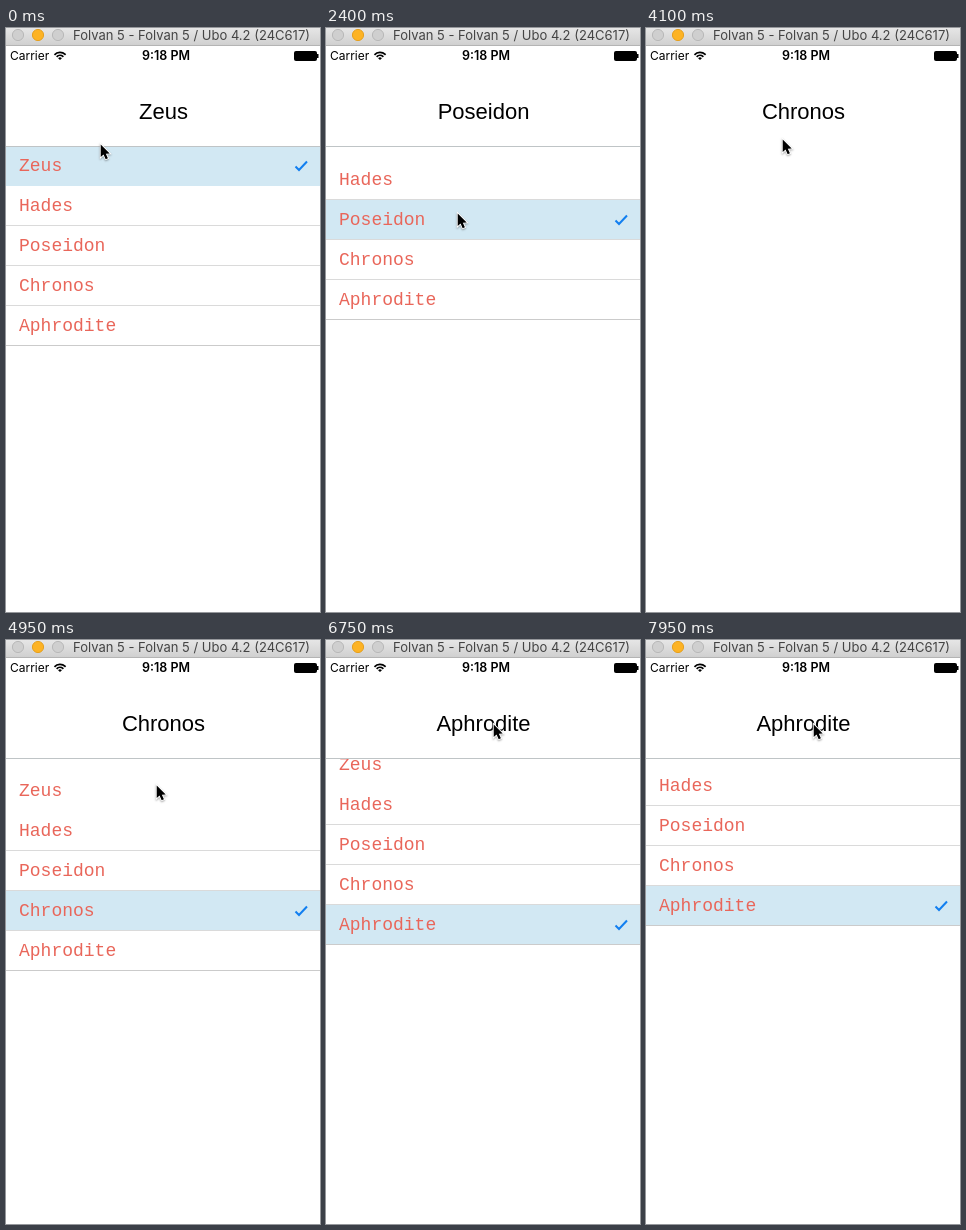
An HTML page with a canvas for the animation above (8000 ms loop, 314 px wide and 584 px high).

```html
<!DOCTYPE html>
<html lang="en">
<head>
<meta charset="utf-8">
<title>Dropdown menu</title>
<style>
  html, body { margin: 0; width: 100%; height: 100%; overflow: hidden; background: #fff; }
  canvas { display: block; }
</style>
</head>
<body>
<canvas id="stage" width="314" height="584"></canvas>
<script>
const ctx = document.getElementById('stage').getContext('2d');
const WIDTH = 314, HEIGHT = 584, LOOP = 8000;
const MENU_TOP = 118, ROW = 40;
const items = ['Zeus', 'Hades', 'Poseidon', 'Chronos', 'Aphrodite'];
const MENU_HEIGHT = items.length * ROW;

// Each close may pick a row; each open springs the list down.
const events = [
  { at: -2000, open: true, pick: 0 },
  { at: 870, open: false },
  { at: 1462, open: true },
  { at: 2333, open: false, pick: 2 },
  { at: 3068, open: true },
  { at: 3770, open: false, pick: 3 },
  { at: 4587, open: true },
  { at: 5722, open: false, pick: 4 },
  { at: 6589, open: true },
  { at: 7246, open: false },
  { at: 7807, open: true }
];

// Pointer tip: time, x, y
const pointer = [
  [0, 94, 116], [150, 94, 116], [700, 159, 85], [1550, 159, 85],
  [2150, 131, 206], [2325, 131, 204], [2400, 131, 185], [2750, 160, 85],
  [3150, 160, 85], [3600, 135, 256], [3770, 135, 256], [4100, 136, 111],
  [4300, 160, 85], [4700, 160, 85], [5400, 127, 291], [5730, 127, 289],
  [5950, 127, 276], [6400, 167, 84], [8000, 167, 84]
];

const smooth = p => p * p * (3 - 2 * p);

function spring(t) {
  const damping = 0.517, peak = 263;
  const phase = Math.PI * t / peak;
  const ratio = damping / Math.sqrt(1 - damping * damping);
  return Math.exp(-ratio * phase) * (Math.cos(phase) + ratio * Math.sin(phase));
}

function menuState(t) {
  let last, selected;
  for (const e of events) {
    if (e.at > t) break;
    last = e;
    selected = e.pick ?? selected;
  }
  const age = t - last.at;
  const hidden = last.open ? spring(age) : smooth(Math.min(1, age / 300));
  return { offset: -MENU_HEIGHT * hidden, selected };
}

function pointerAt(t) {
  const i = pointer.findIndex(k => k[0] > t);
  const [t0, x0, y0] = pointer[i - 1], [t1, x1, y1] = pointer[i];
  const p = smooth((t - t0) / (t1 - t0));
  return [x0 + (x1 - x0) * p, y0 + (y1 - y0) * p];
}

function rect(x, y, w, h, color) {
  ctx.fillStyle = color;
  ctx.fillRect(x, y, w, h);
}

function text(value, x, y, font, color, align = 'left') {
  ctx.font = font;
  ctx.fillStyle = color;
  ctx.textAlign = align;
  ctx.fillText(value, x, y);
}

function polyline(points) {
  ctx.beginPath();
  points.forEach(([x, y]) => ctx.lineTo(x, y));
}

function drawTitleBar() {
  const shade = ctx.createLinearGradient(0, 0, 0, 17);
  shade.addColorStop(0, '#e6e6e6');
  shade.addColorStop(1, '#d0d0d0');
  rect(0, 0, WIDTH, 17, shade);
  rect(0, 17, WIDTH, 1, '#b4b4b4');
  [['#cfcfcf', '#b8b8b8'], ['#fdb324', '#e5a01f'], ['#cfcfcf', '#b8b8b8']].forEach(([fill, edge], i) => {
    ctx.beginPath();
    ctx.arc(12 + 20 * i, 7, 5.6, 0, 2 * Math.PI);
    ctx.fillStyle = fill;
    ctx.fill();
    ctx.strokeStyle = edge;
    ctx.lineWidth = 1;
    ctx.stroke();
  });
  text('Folvan 5 - Folvan 5 / Ubo 4.2 (24C617)', 185.5, 12, '13px Inter, sans-serif', '#444', 'center');
}

function drawStatusBar() {
  text('Carrier', 4, 32, '12px Inter, sans-serif', '#000');
  text('9:18 PM', 160, 32, '600 12.5px Inter, sans-serif', '#000', 'center');

  ctx.strokeStyle = '#000';
  ctx.lineWidth = 1.7;
  for (const r of [4.6, 7.6]) {
    ctx.beginPath();
    ctx.arc(54, 32, r, -Math.PI * 0.76, -Math.PI * 0.24);
    ctx.stroke();
  }
  ctx.beginPath();
  ctx.moveTo(54, 32);
  ctx.arc(54, 32, 2.6, -Math.PI * 0.76, -Math.PI * 0.24);
  ctx.fillStyle = '#000';
  ctx.fill();

  ctx.beginPath();
  ctx.roundRect(288, 23, 23, 10, 2);
  ctx.fill();
  rect(311, 26, 1.5, 4, '#000');
}

function drawMenu({ offset, selected }) {
  if (offset <= -MENU_HEIGHT + 0.5) return;
  ctx.save();
  ctx.beginPath();
  ctx.rect(0, MENU_TOP, WIDTH, HEIGHT - MENU_TOP);
  ctx.clip();
  ctx.translate(0, MENU_TOP + Math.round(offset));
  items.forEach((name, i) => {
    const y = i * ROW;
    if (i === selected) {
      rect(0, y, WIDTH, ROW, '#d2e8f3');
      polyline([[289.5, y + 20.5], [293, y + 24], [301, y + 15.5]]);
      ctx.strokeStyle = '#127ff0';
      ctx.lineWidth = 2;
      ctx.stroke();
    }
    text(name, 13, y + 25, '18px "Liberation Mono", monospace', '#e9665a');
    if (i > 0) rect(0, y + ROW - 1, WIDTH, 1, i === items.length - 1 ? '#cbcbcb' : '#dadada');
  });
  ctx.restore();
  rect(0, MENU_TOP, WIDTH, 1, '#bfc4c6');
}

function drawPointer([x, y]) {
  ctx.save();
  ctx.translate(Math.round(x) + 0.7, Math.round(y) + 0.5);
  ctx.scale(0.9, 0.9);
  polyline([[0, 0], [0, 14], [3.2, 11], [5.5, 16.3], [8, 15.2], [5.7, 10.2], [10, 10]]);
  ctx.closePath();
  ctx.shadowColor = 'rgba(0,0,0,.35)';
  ctx.shadowBlur = 2;
  ctx.shadowOffsetY = 1;
  ctx.strokeStyle = '#fff';
  ctx.lineWidth = 2;
  ctx.stroke();
  ctx.shadowColor = 'transparent';
  ctx.fillStyle = '#000';
  ctx.fill();
  ctx.restore();
}

function draw(now) {
  const t = now % LOOP;
  const state = menuState(t);
  rect(0, 0, WIDTH, HEIGHT, '#fff');
  drawTitleBar();
  drawStatusBar();
  text(items[state.selected], 157.5, 91, '22px "Liberation Sans", sans-serif', '#000', 'center');
  drawMenu(state);
  drawPointer(pointerAt(t));
}

const start = performance.now();
function tick() {
  draw(performance.now() - start);
  requestAnimationFrame(tick);
}
tick();
</script>
</body>
</html>
```
